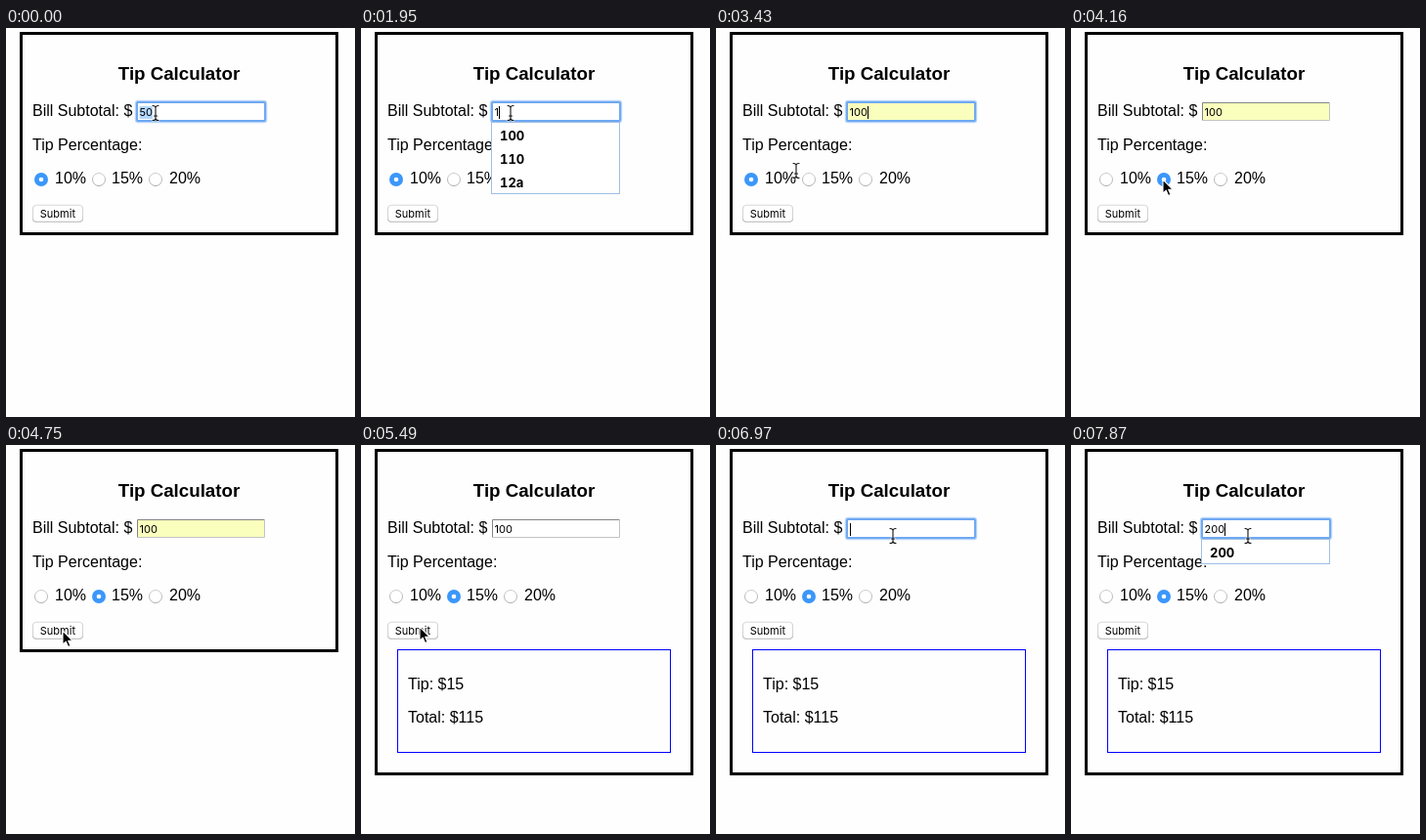
An HTML page that plays this animation: 357 by 398 pixels, repeating every 8000 ms.

```html
<!DOCTYPE html>
<html lang="en">
<head>
<meta charset="utf-8">
<title>Tip Calculator</title>
<style>
  html, body { margin: 0; width: 100%; height: 100%; overflow: hidden; background: #fefefe; }
  svg { display: block; width: 357px; height: 398px; }
  text { font: 16px "Liberation Sans", Arial, sans-serif; fill: #000; white-space: pre; }
  .title { font-size: 18.72px; font-weight: bold; text-anchor: middle; }
  .small { font: 11px Inter, sans-serif; }
  .item { font: 700 13px Inter, sans-serif; font-variant-numeric: tabular-nums; }
</style>
</head>
<body>
<svg viewBox="0 0 357 398">
  <defs>
    <linearGradient id="rim" x2="0" y2="1">
      <stop offset="0" stop-color="#ccc"/><stop offset="1" stop-color="#aaa"/>
    </linearGradient>
  </defs>

  <rect id="frame" x="15.5" y="5.5" width="323" height="205" fill="none" stroke="#000" stroke-width="3"/>
  <text class="title" x="177" y="53">Tip Calculator</text>
  <text x="27" y="90">Bill Subtotal: $</text>
  <text x="27" y="125">Tip Percentage:</text>
  <g id="radios"></g>

  <rect x="27" y="181.6" width="52" height="17.2" rx="4" fill="url(#rim)"/>
  <rect x="27.6" y="181.2" width="50.8" height="16.8" rx="3.5" fill="#fff" stroke="#d2d2d2" stroke-width=".8"/>
  <text class="small" x="34.8" y="194">Submit</text>

  <g id="result">
    <rect x="37.5" y="209.5" width="279" height="105" fill="none" stroke="#00f"/>
    <text x="48" y="250">Tip: $15</text>
    <text x="48" y="284">Total: $115</text>
  </g>

  <rect id="field" x="134" y="76" width="131" height="19"/>
  <path id="inset" d="M134.5 95V76.5H265" fill="none" stroke="#848484"/>
  <path id="inset2" d="M134 94.5H264.5V76" fill="none" stroke="#c4c4c4"/>
  <g id="ring" fill="none">
    <rect x="132.8" y="74.8" width="133.4" height="21.4" rx="2.5" stroke="#b9d6fa" stroke-width="2"/>
    <rect x="134" y="76" width="131" height="19" rx="1" stroke="#6fa9f2" stroke-width="2"/>
  </g>
  <rect id="mark" x="136.5" y="80" height="13" fill="#b3d7fe"/>
  <text id="value" class="small" x="136.5" y="90"></text>
  <rect id="caret" y="80" width="1" height="13" fill="#000"/>

  <g id="menu"></g>

  <path id="arrow" d="M0 0V14.2L3.3 11.2L5.6 16.6L8 15.6L5.7 10.3H10.2Z"
        fill="#000" stroke="#fff" stroke-width="1.1" stroke-linejoin="round"/>
  <g id="beam" fill="none" stroke-linecap="round">
    <path d="M-3-7.5Q0-7.5 0-5.5Q0-7.5 3-7.5M0-5.5V5.5M-3 7.5Q0 7.5 0 5.5Q0 7.5 3 7.5M-1.5 3H1.5"
          stroke="#fff" stroke-width="2.6" opacity=".7"/>
    <path d="M-3-7.5Q0-7.5 0-5.5Q0-7.5 3-7.5M0-5.5V5.5M-3 7.5Q0 7.5 0 5.5Q0 7.5 3 7.5M-1.5 3H1.5"
          stroke="#111" stroke-width="1.1"/>
  </g>
</svg>
<script>
const LOOP = 8000;
const $ = id => document.getElementById(id);

const start = {
  text: "50", menu: [], hover: false, marked: true, caret: false, focus: true,
  filled: false, choice: 0, result: false, cursor: "beam", at: [153, 87]
};

// Each step lists only what changes at that time.
const steps = [
  [150, { menu: ["50"] }],
  [1950, { text: "1", marked: false, caret: true, menu: ["100", "110", "12a"] }],
  [2100, { text: "10", menu: ["100"] }],
  [2250, { text: "100" }],
  [2690, { caret: false, cursor: "arrow", at: [167, 124] }],
  [2840, { at: [170, 129] }],
  [2990, { at: [165, 112], hover: true, filled: true }],
  [3140, { at: [163, 112], hover: false, menu: [], caret: true }],
  [3280, { at: [114, 130], cursor: "beam" }],
  [3430, { at: [82, 146] }],
  [3570, { at: [69, 153] }],
  [3720, { at: [65, 155], caret: false }],
  [3870, { at: [80, 155] }],
  [4020, { at: [94, 155], cursor: "arrow" }],
  [4160, { choice: 1, focus: false }],
  [4310, { at: [86, 167] }],
  [4460, { at: [70, 181] }],
  [4600, { at: [60, 188] }],
  [4750, { at: [58, 190] }],
  [5040, { filled: false, result: true }],
  [5490, { at: [60, 186] }],
  [5640, { at: [88, 160] }],
  [5790, { at: [134, 122] }],
  [5930, { at: [172, 97] }],
  [6080, { at: [181, 93], cursor: "beam" }],
  [6220, { focus: true, caret: true }],
  [6670, { marked: true, caret: false, menu: ["100"] }],
  [6970, { text: "", marked: false, caret: true, menu: [] }],
  [7420, { text: "2", menu: ["200", "250"] }],
  [7720, { text: "20", menu: ["200"] }],
  [7870, { text: "200" }]
];

const show = (id, on) => $(id).setAttribute("visibility", on ? "visible" : "hidden");
const set = (id, name, value) => $(id).setAttribute(name, value);

function radios(choice) {
  return [[36, 50], [95, 108], [153, 167]].map(([cx, x], i) => {
    const dot = i === choice
      ? `<circle cx="${cx}" cy="155" r="7" fill="#3b97fb"/><circle cx="${cx}" cy="155" r="2.3" fill="#fff"/>`
      : `<circle cx="${cx}" cy="155" r="6.5" fill="#fff" stroke="url(#rim)"/>`;
    return `${dot}<text x="${x}" y="159">${10 + 5 * i}%</text>`;
  }).join("");
}

function menu(items, hover) {
  if (!items.length) return "";
  const box = `<rect x="133.5" y="96.5" width="131" height="${24 * items.length + 1}" fill="#fff" stroke="#9fbfe3"/>`;
  const glow = hover ? `<rect x="134" y="97" width="130" height="24" fill="#e0e0e0"/>` : "";
  return box + glow + items.map((s, i) =>
    `<text class="item" x="142" y="${114.7 + 24 * i}">${s}</text>`).join("");
}

function draw(s) {
  set("frame", "height", s.result ? 331 : 205);
  show("result", s.result);
  $("radios").innerHTML = radios(s.choice);

  set("field", "fill", s.filled ? "#faffbd" : "#fff");
  show("ring", s.focus);
  show("inset", !s.focus);
  show("inset2", !s.focus);
  $("value").textContent = s.text;
  const width = s.text ? $("value").getComputedTextLength() : 0;
  set("mark", "width", width);
  show("mark", s.marked);
  set("caret", "x", Math.round(136.5 + width));
  show("caret", s.caret && s.focus);

  $("menu").innerHTML = menu(s.menu, s.hover);
  for (const id of ["arrow", "beam"]) {
    show(id, s.cursor === id);
    set(id, "transform", `translate(${s.at})`);
  }
}

let shown = -1;
const origin = performance.now();

function tick() {
  const t = (performance.now() - origin) % LOOP;
  const past = steps.filter(([time]) => time <= t);
  if (past.length !== shown) {
    shown = past.length;
    draw(Object.assign({}, start, ...past.map(step => step[1])));
  }
  requestAnimationFrame(tick);
}
tick();
</script>
</body>
</html>
```
